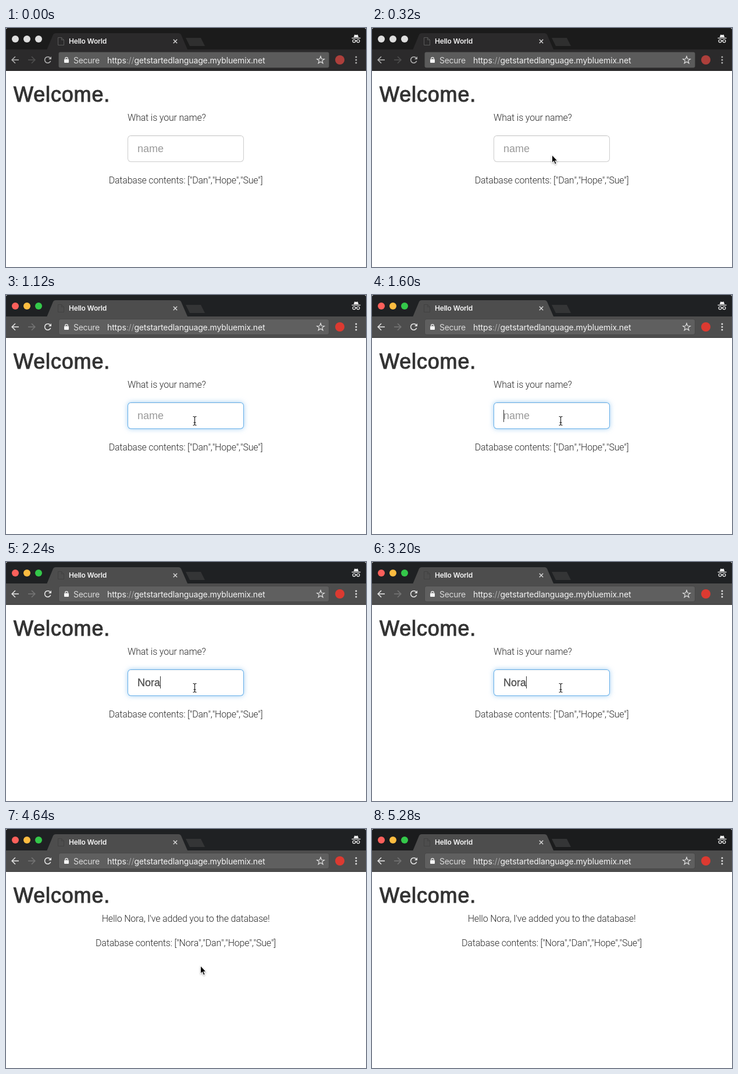
Recreate the animation shown at these times as an HTML page with a canvas. Size 619x412 px, loop 5440 ms.

```html
<!DOCTYPE html>
<html lang="en">
<head>
<meta charset="utf-8">
<title>Hello World</title>
<style>
  html, body { margin: 0; width: 100%; height: 100%; overflow: hidden; background: #fff; }
  canvas { display: block; }
</style>
</head>
<body>
<canvas id="stage" width="619" height="412"></canvas>
<script>
const ctx = document.getElementById('stage').getContext('2d');
const LOOP = 5440, STEP = 160;
const UI = 'Inter, "Open Sans", sans-serif';
const SANS = '"Liberation Sans", Arial, sans-serif';
const LIGHT = 'Roboto, "Open Sans", sans-serif';
const GUEST = 'Nora', OTHERS = ['Dan', 'Hope', 'Sue'];

// Pointer stops: [start time, shape, x, y]
const POINTER = [
  [0, 'none', 0, 0],
  [160, 'arrow', 325, 226.5],
  [320, 'arrow', 310, 219.5],
  [480, 'arrow', 304, 217.5],
  [800, 'beam', 317, 216],
  [960, 'beam', 324.5, 217],
  [3360, 'arrow', 325, 217.5],
  [4640, 'arrow', 335, 236.5],
  [4800, 'arrow', 390, 321.5],
  [4960, 'arrow', 432, 400.5],
  [5120, 'none', 0, 0]
];

const ACTIVE = {
  strip: '#1f2123', bar: '#4d4d4d', field: '#5f5f5f', edge: '#424242', plus: '#343536',
  icon: '#e4e4e4', dim: '#757575', text: '#f5f5f5', soft: '#dadada', page: '#414141',
  lights: ['#fc605b', '#fdbc40', '#34c84a'], badge: '#dc3a31'
};
const IDLE = {
  strip: '#1b1b1b', bar: '#2b2a2b', field: '#5b5b5b', edge: '#555', plus: '#2f2f2f',
  icon: '#b0b0b0', dim: '#505050', text: '#f0f0f0', soft: '#d8d8d8', page: '#5a5a5a',
  lights: ['#dedede', '#dedede', '#dedede'], badge: '#ad3f3b'
};

function text(str, x, y, font, color, spacing = 0, align = 'left') {
  ctx.font = font;
  ctx.letterSpacing = spacing + 'px';
  ctx.textAlign = align;
  ctx.fillStyle = color;
  ctx.fillText(str, x, y);
  return ctx.measureText(str).width;
}

function embolden(str, x, y, width, color) {
  ctx.strokeStyle = color;
  ctx.lineWidth = width;
  ctx.strokeText(str, x, y);
}

function trace(points, close) {
  ctx.beginPath();
  points.forEach(([x, y]) => ctx.lineTo(x, y));
  if (close) ctx.closePath();
}

function poly(points, color) {
  trace(points, true);
  ctx.fillStyle = color;
  ctx.fill();
}

function line(points, color, width, close) {
  trace(points, close);
  ctx.strokeStyle = color;
  ctx.lineWidth = width;
  ctx.stroke();
}

function disc(x, y, r, color) {
  ctx.beginPath();
  ctx.arc(x, y, r, 0, Math.PI * 2);
  ctx.fillStyle = color;
  ctx.fill();
}

function ring(x, y, r, color, width, from = 0, to = Math.PI * 2) {
  ctx.beginPath();
  ctx.arc(x, y, r, from, to);
  ctx.strokeStyle = color;
  ctx.lineWidth = width;
  ctx.stroke();
}

function box(x, y, w, h, r, color) {
  ctx.beginPath();
  ctx.roundRect(x, y, w, h, r);
  ctx.fillStyle = color;
  ctx.fill();
}

function drawTabs(c, strip) {
  box(0, 0, 619, 38, [3, 3, 0, 0], strip);
  ctx.fillStyle = c.bar;
  ctx.fillRect(0, 37, 619, 37);
  c.lights.forEach((color, i) => disc(16 + 20 * i, 19, 6, color));

  ctx.beginPath();
  ctx.moveTo(70, 38);
  ctx.lineTo(81, 11.5);
  ctx.quadraticCurveTo(82, 9, 85, 9);
  ctx.lineTo(297, 9);
  ctx.quadraticCurveTo(300, 9, 301, 11.5);
  ctx.lineTo(312.5, 38);
  ctx.fillStyle = c.bar;
  ctx.fill();

  line([[89.5, 16.5], [95.5, 16.5], [99.5, 20.5], [99.5, 29.5], [89.5, 29.5]], c.page, 1, true);
  line([[95.5, 16.5], [95.5, 20.5], [99.5, 20.5]], c.page, 1);
  text('Hello World', 108, 27, '600 12px ' + UI, c.text, -0.2);
  line([[287.8, 19.8], [294.2, 26.2]], c.soft, 1.3);
  line([[294.2, 19.8], [287.8, 26.2]], c.soft, 1.3);
  poly([[309, 17], [335, 17], [342, 31], [316, 31]], c.plus);

  // hat and glasses
  const white = '#f2f2f2';
  poly([[597.8, 16], [599.2, 11.6], [602, 12], [604.8, 11.6], [606.2, 16]], white);
  ctx.fillRect(594.5, 16.8, 15, 1.3);
  ring(598.5, 22.4, 2.4, white, 1.2);
  ring(605.5, 22.4, 2.4, white, 1.2);
  line([[600.8, 22], [603.2, 22]], white, 1.1);
}

function arrowIcon(x, dir, color) {
  line([[x - 6 * dir, 55], [x + 6 * dir, 55]], color, 1.6);
  line([[x, 49.3], [x + 5.8 * dir, 55], [x, 60.7]], color, 1.6);
}

function drawToolbar(c) {
  arrowIcon(16, -1, c.icon);
  arrowIcon(44, 1, c.dim);
  ring(71.8, 55, 5.2, c.icon, 1.6, 0.35, 5.5);
  poly([[78, 49], [78, 54], [73, 54]], c.icon);

  box(90.5, 41.5, 465, 27, 3, c.edge);
  box(91, 42, 464, 26, 3, c.field);
  box(100, 53.5, 8, 6.5, 1, '#f4f4f4');
  ring(104, 53, 2.3, '#f4f4f4', 1.3, Math.PI, 0);
  const font = '400 14px ' + UI;
  text('Secure', 116, 60.5, font, c.soft, -0.3);
  let x = 174;
  [['https', c.text], ['://', '#a8a8a8'], ['getstartedlanguage.mybluemix.net', c.text]]
    .forEach(([part, color]) => { x += text(part, x, 60.5, font, color, -0.14); });

  const star = Array.from({ length: 10 }, (_, i) => {
    const r = i % 2 ? 2.8 : 6.7, a = i * Math.PI / 5 - Math.PI / 2;
    return [541 + r * Math.cos(a), 55.5 + r * Math.sin(a)];
  });
  line(star, '#e2e2e2', 1.2, true);
  disc(574, 55, 8, c.badge);
  [50, 55, 60].forEach(y => disc(602, y, 1.5, c.icon));
  ctx.fillStyle = 'rgba(0,0,0,.25)';
  ctx.fillRect(0, 73, 619, 1);
}

function drawField(focused) {
  ctx.save();
  if (focused) {
    ctx.shadowColor = 'rgba(102,175,233,.6)';
    ctx.shadowBlur = 8;
  }
  box(209, 185, 200, 46, 6, focused ? '#66afe9' : '#ccc');
  ctx.restore();
  box(210, 186, 198, 44, 5, '#fff');
  ctx.fillStyle = 'rgba(0,0,0,.06)';
  ctx.fillRect(214, 186, 190, 1);
}

function pageText(str, x, y, align) {
  ctx.fontKerning = 'none';
  text(str, x, y, '300 16px ' + LIGHT, '#2b2b2b', -0.2, align);
  ctx.fontKerning = 'auto';
}

function drawForm(t) {
  const focused = t >= 640;
  pageText('What is your name?', 209, 160);
  drawField(focused);

  const typed = GUEST.slice(0, t < 1920 ? 0 : t < 2080 ? 2 : t < 2240 ? 3 : 4);
  const font = '400 18px ' + SANS;
  let caretX = 226;
  if (typed) {
    caretX += text(typed, 226, 214, font, '#505050');
    embolden(typed, 226, 214, 0.35, '#505050');
  } else {
    text('name', 226, 214, font, '#999');
  }
  const blinkFrom = t < 2240 ? 640 : 2240;
  const blinkOn = Math.floor((t - blinkFrom) / 480) % 2 === 0;
  if (focused && (blinkOn || (t >= 1600 && t < 2240))) {
    ctx.fillStyle = '#333';
    ctx.fillRect(Math.round(caretX), typed ? 197 : 198, 1, 21);
  }
}

function contents(names) {
  return 'Database contents: ' + JSON.stringify(names);
}

function drawPage(t) {
  text('Welcome.', 13, 127, '400 36px ' + SANS, '#333', 0.85);
  embolden('Welcome.', 13, 127, 1.1, '#333');
  if (t < 3360) {
    drawForm(t);
    pageText(contents(OTHERS), 309, 268, 'center');
  } else {
    pageText(`Hello ${GUEST}, I've added you to the database!`, 309, 160, 'center');
    pageText(contents([GUEST, ...OTHERS]), 309, 202, 'center');
  }
}

function drawArrow(x, y) {
  ctx.save();
  ctx.translate(x, y);
  ctx.shadowColor = 'rgba(0,0,0,.35)';
  ctx.shadowBlur = 3;
  ctx.shadowOffsetY = 1;
  poly([[-1, -1.5], [-1, 14], [2.3, 11], [4.5, 16], [7.6, 14.8], [5.6, 10], [10, 10]], '#fff');
  ctx.shadowColor = 'transparent';
  poly([[0, 0.5], [0, 12], [2.7, 9.3], [5, 14.7], [6.5, 14.1], [4.2, 8.9], [8, 8.9]], '#000');
  ctx.restore();
}

function drawBeam(x, y) {
  [['#fff', 2.6], ['#222', 1.2]].forEach(([color, width]) => {
    line([[x, y - 6.5], [x, y + 6.5]], color, width);
    line([[x - 3, y - 7.5], [x - 1.2, y - 7.5], [x, y - 6], [x + 1.2, y - 7.5], [x + 3, y - 7.5]], color, width);
    line([[x - 3, y + 7.5], [x - 1.2, y + 7.5], [x, y + 6], [x + 1.2, y + 7.5], [x + 3, y + 7.5]], color, width);
    line([[x - 2, y + 3], [x + 2, y + 3]], color, width);
  });
}

function drawPointer(t) {
  const [, shape, x, y] = POINTER.findLast(stop => stop[0] <= t);
  if (shape === 'arrow') drawArrow(x, y);
  if (shape === 'beam') drawBeam(x, y);
}

function draw(t) {
  const c = t < 480 ? IDLE : ACTIVE;
  ctx.fillStyle = '#fff';
  ctx.fillRect(0, 0, 619, 412);
  drawTabs(c, t >= 5280 ? '#1b1c1d' : c.strip);
  drawToolbar(c);
  drawPage(t);
  drawPointer(t);
}

const start = performance.now();
function tick() {
  const t = (performance.now() - start) % LOOP;
  draw(Math.floor(t / STEP) * STEP);
  requestAnimationFrame(tick);
}
tick();
</script>
</body>
</html>
```
